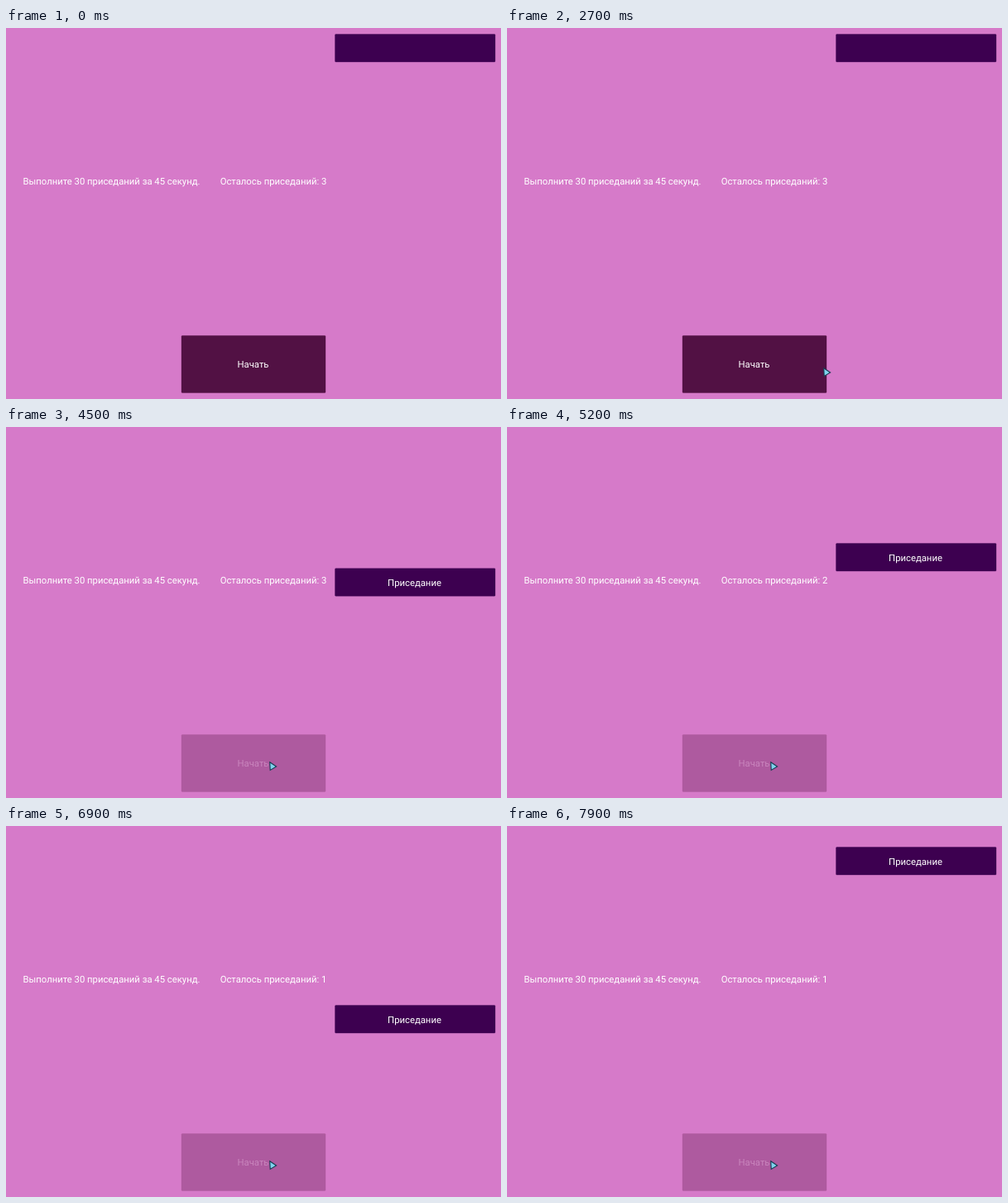
Recreate the animation shown at these times as an HTML page. Size 598 px wide and 448 px high, loop 8000 ms.

```html
<!DOCTYPE html>
<html lang="ru">
<head>
<meta charset="utf-8">
<style>
  html, body { margin: 0; width: 100%; height: 100%; overflow: hidden; background: #d67ac9; }
  svg { display: block; width: 598px; height: 448px; }
  text { font: 11.3px Roboto, sans-serif; fill: #fff; text-anchor: middle; text-rendering: geometricPrecision; }
  rect { stroke-opacity: .35; }
</style>
</head>
<body>
<svg viewBox="0 0 598 448">
  <text x="127.5" y="189">Выполните 30 приседаний за 45 секунд.</text>
  <text id="left" x="323" y="189"></text>
  <g id="runner">
    <rect x="397.5" y=".5" width="193.5" height="33.5" rx="1" fill="#3d0050" stroke="#3d0050"/>
    <text id="runnerLabel" x="493.5" y="22">Приседание</text>
  </g>
  <rect id="start" x="212" y="371.5" width="174" height="69" rx="1"/>
  <text id="startLabel" x="298.5" y="410">Начать</text>
  <path id="cursor" d="M.7 .7 L8.6 6 L1.2 10.4 Z" fill="#7fd3ee" stroke="#173a50" stroke-width="1.1"/>
</svg>
<script>
const LOOP = 8000, STEP = 100;
const PRESS = 3200, RELEASE = 3300;
const TOP = 7, TRAVEL = 322, SPEED = 322 / 750;
// start and end of each squat, in ms
const SQUATS = [[3341, 4880], [4890, 6396], [6413, 7942]];
// resting places of the pointer: time, x, y
const STOPS = [[1100, 453, 132], [2000, 336, 402], [2700, 382, 410], [2800, 376, 407], [3000, 318, 404]];

const el = id => document.getElementById(id);
const [left, runner, runnerLabel, start, startLabel, cursor] =
  ['left', 'runner', 'runnerLabel', 'start', 'startLabel', 'cursor'].map(el);
const move = (node, x, y) => node.setAttribute('transform', `translate(${x} ${y})`);

function runnerTop(t) {
  const squat = SQUATS.find(([from, to]) => t >= from && t < to);
  if (!squat) return TOP;
  return TOP + Math.min(TRAVEL, SPEED * Math.min(t - squat[0], squat[1] - t));
}

function cursorAt(t) {
  if (t < 1100) {
    const p = Math.max(0, (t - 400) / 700);
    return [70 + 383 * p, 46 + 86 * p ** 1.6];
  }
  return STOPS.filter(([time]) => time <= t).pop().slice(1);
}

function draw(t) {
  const done = SQUATS.filter(([, end]) => t >= end).length;
  left.textContent = `Осталось приседаний: ${3 - done}`;

  move(runner, 0, runnerTop(t));
  runnerLabel.style.visibility = t >= RELEASE ? 'visible' : 'hidden';

  const color = t < PRESS ? '#521144' : t < RELEASE ? '#2d1f9a' : '#ae5a9f';
  start.setAttribute('fill', color);
  start.setAttribute('stroke', color);
  startLabel.style.fill = t < RELEASE ? '#fff' : '#c985bd';

  cursor.style.visibility = t < 400 ? 'hidden' : 'visible';
  move(cursor, ...cursorAt(t));
}

function tick() {
  draw(Math.floor(performance.now() % LOOP / STEP) * STEP);
  requestAnimationFrame(tick);
}
tick();
</script>
</body>
</html>
```
